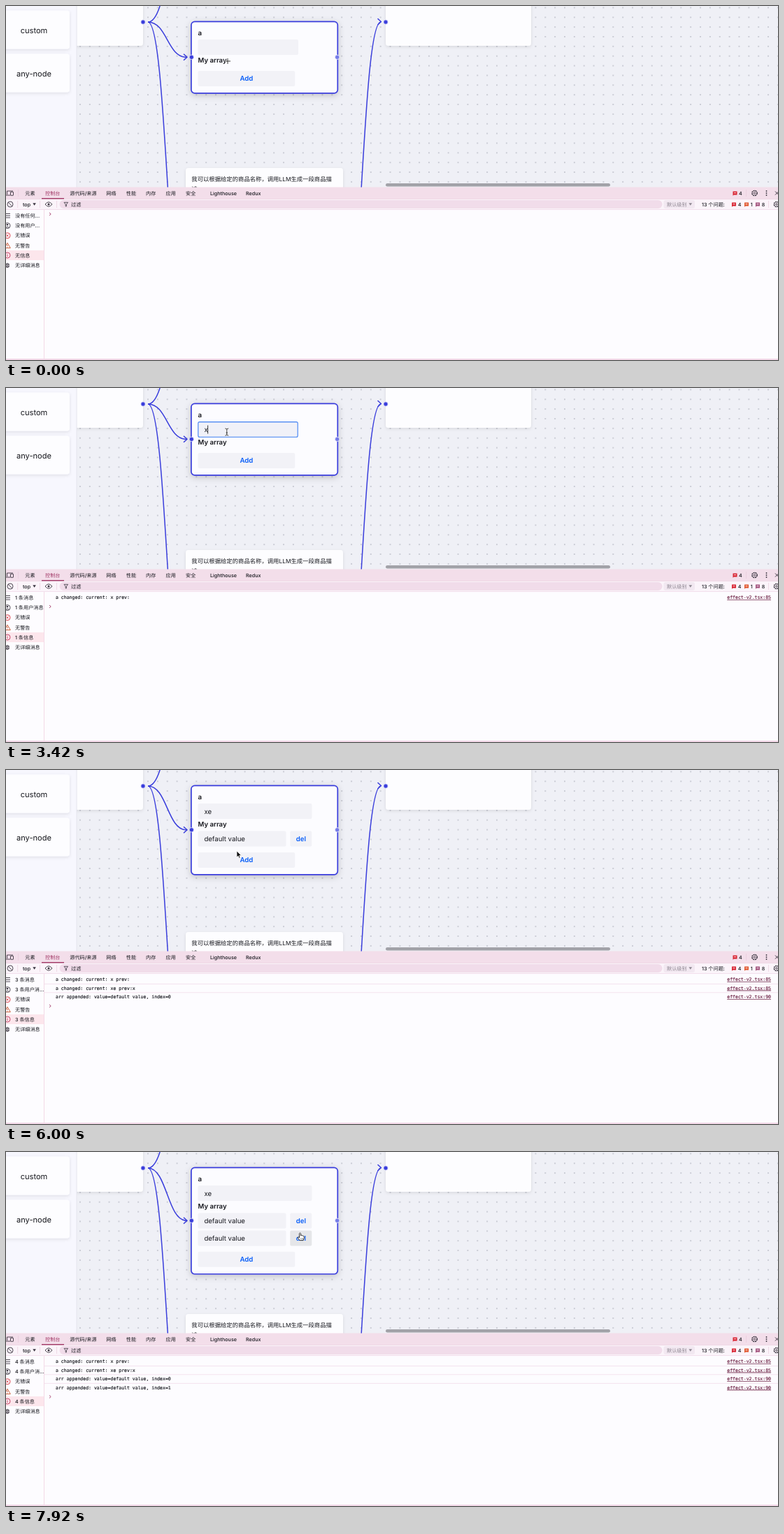
Animation, 1104 px wide and 507 px high, one loop 8 s. Source, as an HTML page:

```html
<!DOCTYPE html>
<html lang="zh-CN">
<head>
<meta charset="utf-8">
<title>Flow form effects</title>
<style>
  html, body { margin: 0; width: 100%; height: 100%; overflow: hidden; background: #fdfcff; }
  svg { display: block; width: 1104px; height: 507px; }
  text { font-family: Inter, "Noto Sans CJK SC", "Noto Sans CJK", sans-serif; text-rendering: geometricPrecision; white-space: pre; }
  #tools text, #log text { font-weight: 500; }
  #log .mono { font-family: "DejaVu Sans Mono", monospace; font-size: 6.52px; stroke: currentColor; stroke-width: .15; }
</style>
</head>
<body>
<svg id="stage" viewBox="0 0 1104 507" xmlns="http://www.w3.org/2000/svg">
  <defs>
    <pattern id="dots" x="99.07" y="-4.53" width="13.86" height="13.86" patternUnits="userSpaceOnUse">
      <circle cx="6.93" cy="6.93" r=".7" fill="#8f929f"/>
    </pattern>
    <filter id="soft" x="-20%" y="-30%" width="140%" height="170%">
      <feDropShadow dx="0" dy="1.5" stdDeviation="2.2" flood-color="#000" flood-opacity=".1"/>
    </filter>
    <filter id="lift" x="-20%" y="-30%" width="140%" height="170%">
      <feDropShadow dx="0" dy="2.5" stdDeviation="5" flood-color="#000" flood-opacity=".2"/>
    </filter>
    <clipPath id="side"><rect y="260" width="54.5" height="247"/></clipPath>
  </defs>
  <g id="board"></g>
  <g id="form"></g>
  <g id="tools"></g>
  <g id="log"></g>
  <g id="pointer"></g>
</svg>
<script>
const LOOP = 8000, ROW = 24.93;
const BLUE = '#3a3edc', ACTION = '#0a5ff8', INK = '#16171d', ROSE = '#a23a68';
const $ = id => document.getElementById(id);

const rect = (x, y, w, h, fill, r = 0, more = '') =>
  `<rect x="${x}" y="${y}" width="${w}" height="${h}" rx="${r}" fill="${fill}" ${more}/>`;
const text = (x, y, s, size, fill = INK, more = '') =>
  `<text x="${x}" y="${y}" font-size="${size}" fill="${fill}" color="${fill}" ${more}>${s}</text>`;
const line = (d, color, width = 1, more = '') =>
  `<path d="${d}" fill="none" stroke="${color}" stroke-width="${width}" ${more}/>`;
const solid = (d, fill) => `<path d="${d}" fill="${fill}"/>`;
const disc = (x, y, r, fill, more = '') => `<circle cx="${x}" cy="${y}" r="${r}" fill="${fill}" ${more}/>`;
const ring = (x, y, r, color, width = .9, more = '') =>
  disc(x, y, r, 'none', `stroke="${color}" stroke-width="${width}" ${more}`);
const bold = 'font-weight="600"', mid = 'text-anchor="middle"';

// S-shaped link between two ports
const link = (x1, y1, x2, y2) => {
  const m = (x1 + x2) / 2;
  return line(`M${x1} ${y1}C${m} ${y1} ${m} ${y2} ${x2} ${y2}`, BLUE, 1.5);
};
const arrow = (x, y) => line(`M${x - 5} ${y - 4.5}L${x} ${y}L${x - 5} ${y + 4.5}`, BLUE, 1.5, 'stroke-linejoin="round"');
const port = (x, y, color = BLUE) => disc(x, y, 3.2, color, 'stroke="#f4f4fb" stroke-width=".8"');

function drawBoard() {
  const panel = (x, y, w, h) => rect(x, y, w, h, '#fdfdff', 4, 'filter="url(#soft)"');
  const card = (y, label) => panel(-6, y, 97, 55) + text(40, y + 32, label, 11.1, INK, mid);
  return rect(0, 0, 1104, 260, '#eff0f6') + rect(101, 0, 1003, 260, 'url(#dots)') +
    link(203, 23, 258, -110) + link(203, 23, 258, 470) +
    link(482, 470, 536, 23) + arrow(536.5, 22.5) +
    panel(60, -20, 136, 77) + port(196, 23) +
    panel(543, -20, 208, 77) + port(543, 23) +
    panel(257, 232, 225, 60) +
    text(265.3, 250.7, '我可以根据给定的商品名称，调用LLM生成一段商品描', 8.35) + text(265.3, 264.6, '述。', 8.35) +
    rect(0, 0, 101, 260, '#f7f7fe') + rect(100.5, 0, 1, 260, '#e6e6ee') +
    card(6.5, 'custom') + card(68.5, 'any-node') +
    rect(543, 254, 321, 4.5, '#a2a2a8', 2.2);
}

const gear = (x, y) => ring(x, y, 3.6, '#3a3540', 1.5, 'stroke-dasharray="2.2 .7"') + ring(x, y, 1.3, '#3a3540', .8);
const badge = (x, y, color) =>
  solid(`M${x} ${y - 2.5}h6v5h-4.6l-1.4 1.3z`, color) + rect(x + 1.4, y - .7, 3.2, .9, '#fff');
const caretDown = (x, y, color) => solid(`M${x} ${y - 1.5}h4.6l-2.3 3.4z`, color);

function drawTools() {
  const dark = '#3a3540', pale = '#8f8792';
  const divider = (x, y) => rect(x, y, .6, 10, '#e6c8d9');
  const tabs = [[27.3, '元素'], [56, '控制台', ROSE], [91.3, '源代码/来源'], [143.3, '网络'], [171.8, '性能'], [200, '内存'],
    [228.5, '应用'], [257, '安全'], [292, 'Lighthouse'], [343, 'Redux']];
  const issues = [[1038, '#d8202f', 4], [1056, '#e0542c', 1], [1072, '#a3527d', 8]];
  return rect(0, 260, 1104, 247, '#fdfcff') +
    rect(0, 259.5, 1104, 17, '#f3deea') + rect(0, 276.3, 1104, .8, '#ecd0e0') +
    rect(0, 277, 1104, 14.3, '#fbf4fa') + rect(0, 291, 1104, .8, '#f0d9e8') +
    tabs.map(([x, s, c]) => text(x, 270.5, s, 7.15, c)).join('') +
    rect(51, 275, 32, 1.4, ROSE) +
    line('M1.5 270v-5h8.5M0 271h6', dark, .9) + rect(6.5, 266.3, 4, 5, 'none', .5, `stroke="${dark}" stroke-width=".9"`) +
    divider(17, 263) + badge(1039.5, 268, '#d8202f') + text(1048, 270.6, '4', 7.15) + divider(1058, 263) +
    gear(1070.5, 268) + [-3, 0, 3].map(d => disc(1087.5, 268 + d, .9, dark)).join('') +
    line('M1100 265.5l5 5M1105 265.5l-5 5', dark) +
    ring(6, 284, 4, dark) + line('M3.2 281.2l5.6 5.6', dark, .9) + divider(16.5, 279) +
    text(24, 286.5, 'top', 7.15) + caretDown(38.3, 283.8, dark) + divider(48, 279) +
    line('M56 284q5 -6.4 10 0q-5 6.4 -10 0z', dark, .9) + disc(61, 284, 1.5, dark) + divider(72, 279) +
    rect(76.5, 278, 862, 12, '#f1dcea', 6) +
    line('M83 281.3h5.6l-2.2 2.8v2.8h-1.2v-2.8z', dark, .8) + text(93, 286.7, '过滤', 7.15) +
    rect(940.5, 278, 44.5, 12, '#f2e8f1', 3) + text(945, 286.7, '默认级别', 7.15, pale) + caretDown(976.5, 283.8, pale) +
    text(995, 286.7, '13 个问题:', 7.15) +
    issues.map(([x, c, n]) => badge(x, 284, c) + text(x + 8.7, 286.6, n, 7.15)).join('') +
    divider(1090, 279) + gear(1102, 284) +
    rect(0, 350, 54, 14, '#fce6ec') + rect(54, 292, .9, 213, '#f2d6e5') +
    line('M-1 297.5h7M-1 300.3h7M-1 303.1h7', dark, .9) +
    ring(2, 314.6, 4, dark) + disc(2, 313.3, 1.3, dark) + line('M-.6 317.4q2.6 -2.4 5.2 0', dark, .9) +
    ring(2, 328.8, 4, '#d8303a') + line('M.4 327.2l3.2 3.2M3.6 327.2l-3.2 3.2', '#d8303a', .9) +
    line('M2 339.2l4.3 7.4h-8.6z', '#c8532c', .9) + line('M2 341.6v2.4M2 344.8v.9', '#c8532c', .9) +
    ring(2, 357, 4, '#c2385c') + line('M2 356.4v2.6M2 354.8v.9', '#c2385c', .9) +
    rect(0, 368.6, 4, 6, 'none', 2, `stroke="${dark}" stroke-width=".9"`) +
    line('M-1 370h6M-1 373h6M1 370.8h2M1 372.4h2', dark, .8) +
    rect(0, 505, 1104, 2, '#f3d8e8');
}

// Pointer steps: start, kind, x, y
const pointerSteps = [
  [0, 'cross', 317, 79], [80, 'cross', 316.5, 77], [160, 'cross', 316, 73], [250, 'beam', 315, 68], [330, 'beam', 314, 64],
  [420, 'beam', 313, 61], [500, 'beam', 312.6, 59], [580, 'beam', 312.5, 58], [1330, ''],
  [2250, 'beam', 313, 61], [2330, 'cross', 314, 75], [2420, 'arrow', 315, 85], [2500, 'arrow', 315, 90], [2580, 'arrow', 315, 91.5],
  [2750, 'cross', 316, 79], [2830, 'beam', 316, 66], [2920, 'beam', 315.8, 63], [3580, ''],
  [4750, 'beam', 316, 63], [4830, 'beam', 317, 67], [4920, 'cross', 318, 76], [5000, 'arrow', 319, 86], [5080, 'hand', 320, 96],
  [5170, 'hand', 321, 101], [5250, 'hand', 321.5, 103], [5330, 'hand', 321.5, 104],
  [5580, 'beam', 322, 104], [6000, 'arrow', 330, 116], [6080, 'hand', 332, 121],
  [6250, 'arrow', 335, 114], [6330, 'beam', 338, 106], [6420, 'beam', 342, 103], [6500, 'beam', 347, 106], [6580, 'arrow', 352, 115],
  [6670, 'hand', 357, 124], [6750, 'hand', 361, 130], [6830, 'hand', 362.5, 132.5], [6920, 'hand', 362.5, 133.5],
  [7500, 'beam', 363, 133], [7920, 'hand', 420.5, 116]
];
const caretOn = [[750, 1170], [1500, 1920], [2420, 2920], [3420, 4420], [4920, 5500]];
const pressed = [[5500, 5580], [7250, 7420]];
const logs = [
  [1500, 'a changed: current: x prev:', 85], [3920, 'a changed: current: xe prev:x', 85],
  [5580, 'arr appended: value=default value, index=0', 90], [7420, 'arr appended: value=default value, index=1', 90]
];
const within = (spans, t) => spans.some(([a, b]) => t >= a && t < b);

function drawPointer([, kind, x, y]) {
  if (!kind) return '';
  const outlined = (d, w) => line(d, '#fff', w + 1.2) + line(d, '#222', w);
  const shapes = {
    cross: () => outlined('M-4 0H4M0 -4V4', .9),
    beam: () => outlined('M-2.4 -5Q0 -5 0 -3.6Q0 -5 2.4 -5M0 -3.6V3.8M-2.4 5Q0 5 0 3.6Q0 5 2.4 5M-1.2 1.2H1.2', .9),
    arrow: () => '<path d="M0 0V9L2.1 7.1L3.5 10.3L5.1 9.6L3.7 6.5H6.5Z" fill="#111" stroke="#fff" stroke-width=".7"/>',
    hand: () => '<path d="M-1 .6Q0 -1 1 .6V3.8L1.2 3.2Q2.4 2.6 2.8 3.7Q4 3.2 4.3 4.3Q5.7 4 5.7 5.4V7.4L4.6 10.6H-.4L-3.2 7Q-3.4 5.4 -1.9 5.9L-1 6.8Z" ' +
      'fill="#fff" stroke="#222" stroke-width=".9" stroke-linejoin="round"/>' + line('M1.2 7.4v1.8M2.7 7.4v1.8M4.1 7.4v1.8', '#222', .5)
  };
  return `<g transform="translate(${x} ${y})">${shapes[kind]()}</g>`;
}

function drawForm(t, rows, [, kind, px, py]) {
  const over = (x, y, w, h) => kind && px >= x && px <= x + w && py >= y && py <= y + h;
  const box = (x, y, w, press) => rect(x, y, w, 22,
    over(x, y, w, 22) ? press ? '#d9dade' : '#e5e6e9' : '#f2f2f7', 2);
  const button = (x, y, w, label, press) => box(x, y, w, press) +
    text(x + w / 2, y + 14.4, label, 9.66, ACTION, `${bold} ${mid}`);
  const h = 103 + rows * ROW, portY = 73.3 + rows * ROW / 2;
  const value = t < 1500 ? '' : t < 3920 ? 'x' : 'xe';
  const caretX = 284 + [0, 4.6, 9.7][value.length];
  const focused = t >= 750 && t < 5500;
  const field = focused
    ? rect(274.8, 48.6, 142.4, 21.6, '#f0f1f8', 2, 'stroke="#3f7ff2" stroke-width="1.1"')
    : box(274.5, 48, rows ? 163 : 143.5);
  let out = link(203, 23, 258, portY) + arrow(259, portY) +
    rect(264.9, 22.3, 209.4, h - .4, '#fcfcff', 5, `stroke="${BLUE}" stroke-width="1.7" filter="url(#lift)"`) +
    port(265.3, portY) + port(473.7, portY, '#747be8') +
    text(274.5, 42.2, 'a', 9.66, INK, bold) + field + text(283.4, 63, value, 9.66) +
    text(274.5, 81.2, 'My array', 9.6, INK, bold);
  if (focused && t >= 4000) out += line('M283.5 65.8H293', '#e0434c', 1, 'stroke-dasharray="1.1 .9"');
  if (within(caretOn, t)) out += rect(caretX - .4, 53.5, .9, 12, '#222');
  for (let i = 0; i < rows; i++) {
    const y = 87.5 + i * ROW;
    out += box(274.5, y, 126) + text(283.4, y + 14.4, 'default value', 9.6) + button(406.3, y, 31, 'del');
  }
  return out + button(274.5, 93 + rows * ROW, 138.7, 'Add', within(pressed, t));
}

function drawLog(n) {
  const names = n
    ? [`${n} 条消息`, n < 2 ? '1 条用户消息' : `${n} 条用户消...`, '无错误', '无警告', `${n} 条信息`, '无详细消息']
    : ['没有任何...', '没有用户...', '无错误', '无警告', '无信息', '无详细消息'];
  const side = names.map((s, i) => text(13, 302.9 + i * 14.25, s, 7.15)).join('');
  const rows = logs.slice(0, n).map(([, s, num], i) => {
    const y = 302.2 + i * 12.47;
    return text(71, y, s, 6.52, INK, 'class="mono"') +
      text(1094, y, `effect-v2.tsx:${num}`, 6.52, '#6b1f42', 'class="mono" text-anchor="end" text-decoration="underline"') +
      (i ? rect(55, y - 8.7, 1049, .8, '#f2dcea') : '');
  }).join('');
  const y = n ? 313 + (n - 1) * 12.5 : 298;
  return `<g clip-path="url(#side)">${side}</g>` + rows + line(`M62 ${y - 2}l2.2 2l-2.2 2`, ROSE, .9);
}

const shown = {};
function put(id, markup) {
  if (shown[id] !== markup) $(id).innerHTML = shown[id] = markup;
}

function render(t) {
  const step = pointerSteps.filter(s => s[0] <= t).pop();
  const count = logs.filter(l => l[0] <= t).length;
  put('form', drawForm(t, Math.max(0, count - 2), step));
  put('log', drawLog(count));
  put('pointer', drawPointer(step));
}

put('board', drawBoard());
put('tools', drawTools());
const start = performance.now();
(function tick() {
  render((performance.now() - start) % LOOP);
  requestAnimationFrame(tick);
})();
</script>
</body>
</html>
```
